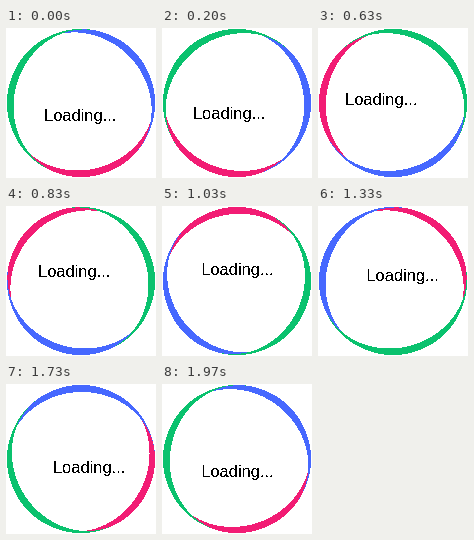
Animation of 150x150 px, one loop 2010 ms. Source, as an HTML page with a canvas:

```html
<!DOCTYPE html>
<html lang="en">
<head>
<meta charset="utf-8">
<title>Loading</title>
<style>
  html, body { margin: 0; width: 100%; height: 100%; overflow: hidden; background: #fff; }
  canvas { display: block; width: 150px; height: 150px; image-rendering: pixelated; }
</style>
</head>
<body>
<canvas id="stage" width="150" height="150"></canvas>
<script>
  const LOOP = 2010, STEPS = 60, SIZE = 150;
  const CENTER = 75, RADIUS = 74, THICK = 7;
  const TEXT_X = 74.2, TEXT_Y = 81.4, SWING = 12;
  const rad = deg => deg * Math.PI / 180;

  // Topmost first; mid is the direction of the thickest point.
  const sectors = [
    { color: [10, 194, 110], mid: 195 },
    { color: [70, 104, 255], mid: -45 },
    { color: [242, 28, 116], mid: 75 }
  ];

  const ctx = document.getElementById('stage').getContext('2d', { willReadFrequently: true });

  // Half ring that tapers to nothing at both ends.
  function inCrescent(x, y, cos, sin) {
    const u = x * cos + y * sin;
    const v = y * cos - x * sin;
    return u > 0 && Math.hypot(u, v) < RADIUS
      && Math.hypot(u / (RADIUS - THICK), v / RADIUS) > 1;
  }

  function drawText(turn) {
    const a = rad(90 + turn);
    ctx.fillStyle = '#fff';
    ctx.fillRect(0, 0, SIZE, SIZE);
    ctx.font = '16.5px "Liberation Sans", Arial, sans-serif';
    ctx.textAlign = 'center';
    ctx.textBaseline = 'alphabetic';
    ctx.fillStyle = '#000';
    ctx.fillText('Loading...', TEXT_X + SWING * Math.cos(a), Math.round(TEXT_Y + SWING * Math.sin(a)));
  }

  // Paints the ring and gives everything hard, unblended edges.
  function draw(turn) {
    drawText(turn);
    const image = ctx.getImageData(0, 0, SIZE, SIZE);
    const arms = sectors.map(({ color, mid }) => {
      const a = rad(mid + turn);
      return { color, cos: Math.cos(a), sin: Math.sin(a) };
    });
    for (let row = 0; row < SIZE; row++) {
      for (let col = 0; col < SIZE; col++) {
        const x = col + 0.5 - CENTER, y = row + 0.5 - CENTER;
        const i = (row * SIZE + col) * 4;
        const arm = arms.find(s => inCrescent(x, y, s.cos, s.sin));
        const ink = image.data[i + 1] < 136 ? [0, 0, 0] : [255, 255, 255];
        image.data.set(arm ? arm.color : ink, i);
      }
    }
    ctx.putImageData(image, 0, 0);
  }

  // 30 steps per second, each starting on a whole hundredth.
  function stepAt(ms) {
    const ticks = Math.floor(ms / 10);
    return Math.min(STEPS - 1, Math.floor((ticks + 0.5) * 0.3));
  }

  const start = performance.now();
  let shown = -1;
  function tick() {
    const step = stepAt((performance.now() - start) % LOOP);
    if (step !== shown) draw(step * 360 / STEPS);
    shown = step;
    requestAnimationFrame(tick);
  }
  tick();
</script>
</body>
</html>
```
